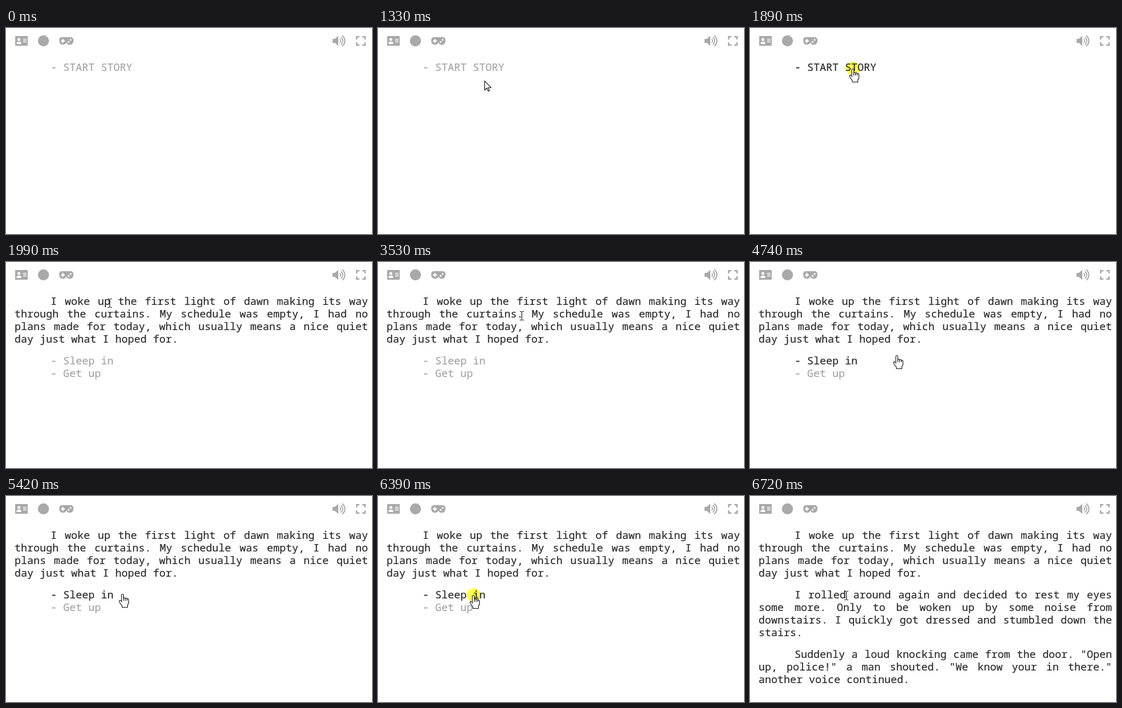
An HTML page with a canvas for the animation above (8000 ms loop, 640x360 px).

```html
<!DOCTYPE html>
<html lang="en">
<head>
<meta charset="utf-8">
<title>Interactive story</title>
<style>
  html, body { margin: 0; width: 100%; height: 100%; overflow: hidden; background: #fff; }
  #stage { position: absolute; left: 0; top: 0; width: 640px; height: 360px; overflow: hidden; background: #fff; }
  p {
    position: absolute; left: 15px; width: 618px; margin: 0;
    font: 18.33px/22px "Noto Sans Mono", monospace; font-variant-ligatures: none;
    color: #2b2b2b; text-align: justify; text-indent: 63px;
    -webkit-text-stroke: 0.2px currentColor;
  }
  p.option { color: #a5a5a5; }
  p.option.hover { color: #2b2b2b; }
  #click {
    position: absolute; width: 24px; height: 24px; border-radius: 50%;
    background: #ffff4a; mix-blend-mode: multiply;
  }
  canvas { position: absolute; left: 0; top: 0; width: 640px; height: 360px; }
</style>
</head>
<body>
<div id="stage">
  <p class="option" data-scenes="0" style="top:57px">- START STORY</p>
  <p data-scenes="12" style="top:57px">I woke up the first light of dawn making its way through the curtains. My schedule was empty, I had no plans made for today, which usually means a nice quiet day just what I hoped for.</p>
  <p class="option" data-scenes="1" style="top:161px">- Sleep in</p>
  <p class="option" data-scenes="1" style="top:183px">- Get up</p>
  <p data-scenes="2" style="top:161px">I rolled around again and decided to rest my eyes some more. Only to be woken up by some noise from downstairs. I quickly got dressed and stumbled down the stairs.</p>
  <p data-scenes="2" style="top:265px">Suddenly a loud knocking came from the door. "Open up, police!" a man shouted. "We know your in there." another voice continued.</p>
  <div id="click"></div>
  <canvas id="view"></canvas>
</div>
<script>
const LOOP = 8000;
const STEP = 110.2; // the pointer is sampled at this interval
const GREY = '#a9a9a9';
const SCENE_STARTS = [0, 1990, 6720];
const CLICKS = [[1890, 1990], [6390, 6720]];

// The pointer enters at ENTRY, then glides through these stops
const ENTRY = { t: 760, x: 444, y: 336 };
const MOVES = [
  { from: 760, to: 1330, x: 185, y: 91 },
  { from: 1330, to: 1550, x: 180, y: 71 },
  { from: 2990, to: 3530, x: 250, y: 93 },
  { from: 3530, to: 4080, x: 270, y: 120 },
  { from: 4190, to: 4740, x: 257, y: 163 },
  { from: 4740, to: 4960, x: 242, y: 169 },
  { from: 5070, to: 5640, x: 178, y: 173 },
  { from: 5750, to: 5860, x: 167, y: 173 }
];

const ARROW = new Path2D('M.5.5V16.5L4.3 13L6.8 18.5L9 17.5L6.5 12.2H11.7Z');
const HAND = new Path2D('M-2 13.5V2Q-2 .5-.25.5T1.5 2V7.5Q3 6 4.5 7.7Q6.5 6.7 7.5 8.7' +
  'Q10.5 8.2 10.5 11V16L8.5 20V23.5H-1V21L-5 15.5Q-7 12.2-5 11.2Q-3.5 11-2 13.5Z');
const KNUCKLES = new Path2D('M1.5 7.5V12M4.5 7.7V12M7.5 8.7V12');
const BEAM = new Path2D('M-2-6.5H1M2-6.5H5M1.5-6V8M-2 8.5H1M2 8.5H5');

const view = document.getElementById('view');
const ctx = view.getContext('2d');
const clickMark = document.getElementById('click');
const texts = [...document.querySelectorAll('p')];
const ratio = window.devicePixelRatio || 1;
view.width = 640 * ratio;
view.height = 360 * ratio;

const smooth = u => u * u * (3 - 2 * u);

function disc(x, y, r) {
  ctx.beginPath();
  ctx.arc(x, y, r, 0, Math.PI * 2);
  ctx.fill();
}

function box(x, y, w, h, r = 0) {
  ctx.beginPath();
  ctx.roundRect(x, y, w, h, r);
  ctx.fill();
}

function drawCard() {
  ctx.fillStyle = GREY;
  box(16, 14, 22, 17, 1);
  ctx.fillStyle = '#fff';
  disc(22.5, 20, 2.6);
  box(18.5, 24, 8, 4, [2, 2, 0, 0]);
  for (let y = 19; y <= 24; y += 2.5) box(30, y, 6, 1.2);
}

function drawGamepad() {
  ctx.fillStyle = GREY;
  box(93, 16, 25, 10, 5);
  disc(99.5, 22.8, 6.5);
  disc(111.5, 22.8, 6.5);
  ctx.fillStyle = '#fff';
  box(96, 21.5, 7, 2.2);
  box(98.4, 19.1, 2.2, 7);
  disc(109.5, 24.3, 1.6);
  disc(113, 20.8, 1.6);
}

function drawSpeaker() {
  ctx.fillStyle = GREY;
  ctx.fill(new Path2D('M571 19H575L581 13.8V31.2L575 26H571Z'));
  ctx.strokeStyle = GREY;
  ctx.lineWidth = 1.9;
  for (let i = 1; i <= 3; i++) {
    ctx.beginPath();
    ctx.arc(581.2, 22.5, i * 3.8, -0.95, 0.95);
    ctx.stroke();
  }
}

// One corner, mirrored around the centre
function drawExpand() {
  ctx.strokeStyle = GREY;
  ctx.lineWidth = 2.5;
  for (const sx of [-1, 1]) {
    for (const sy of [-1, 1]) {
      ctx.beginPath();
      ctx.moveTo(620.5 + sx * 2.5, 22.5 + sy * 7.3);
      ctx.lineTo(620.5 + sx * 7.3, 22.5 + sy * 7.3);
      ctx.lineTo(620.5 + sx * 7.3, 22.5 + sy * 2.5);
      ctx.stroke();
    }
  }
}

function drawToolbar() {
  drawCard();
  ctx.fillStyle = GREY;
  disc(65.5, 22.5, 9.7);
  drawGamepad();
  drawSpeaker();
  drawExpand();
}

function drawPointer({ x, y }, kind) {
  ctx.save();
  ctx.translate(x, y);
  ctx.fillStyle = '#fff';
  ctx.strokeStyle = '#0c0c18';
  ctx.lineWidth = 1.1;
  if (kind === 'beam') {
    ctx.stroke(BEAM);
  } else {
    const shape = kind === 'hand' ? HAND : ARROW;
    ctx.fill(shape);
    ctx.stroke(shape);
    if (kind === 'hand') ctx.stroke(KNUCKLES);
  }
  ctx.restore();
}

function pointerAt(time) {
  const t = Math.floor((time + 10) / STEP) * STEP - 10;
  if (t < ENTRY.t) return null;
  let { x, y } = ENTRY;
  for (const move of MOVES) {
    const u = (t - move.from) / (move.to - move.from);
    const k = smooth(Math.min(1, Math.max(0, u)));
    x += (move.x - x) * k;
    y += (move.y - y) * k;
  }
  return { x: Math.round(x), y: Math.round(y) };
}

// Shows the scene's texts and returns the pointer kind for what lies under it
function layoutTexts(scene, pointer) {
  let kind = 'arrow';
  for (const p of texts) {
    const shown = p.dataset.scenes.includes(scene);
    p.style.display = shown ? '' : 'none';
    if (!shown) continue;
    const dy = pointer ? pointer.y - p.offsetTop : -1;
    const over = dy >= 0 && dy < p.offsetHeight;
    const option = p.classList.contains('option');
    if (option) p.classList.toggle('hover', over);
    if (over) kind = option ? 'hand' : 'beam';
  }
  return kind;
}

function render(t) {
  const scene = SCENE_STARTS.filter(s => s <= t).length - 1;
  const pointer = pointerAt(t);
  const kind = layoutTexts(scene, pointer);

  const clicked = pointer && CLICKS.some(([a, b]) => t >= a && t < b);
  clickMark.style.display = clicked ? '' : 'none';
  if (clicked) {
    clickMark.style.left = pointer.x - 12.5 + 'px';
    clickMark.style.top = pointer.y - 12 + 'px';
  }

  ctx.setTransform(ratio, 0, 0, ratio, 0, 0);
  ctx.clearRect(0, 0, 640, 360);
  drawToolbar();
  if (pointer) drawPointer(pointer, kind);
}

const start = performance.now();
function tick() {
  render((performance.now() - start) % LOOP);
  requestAnimationFrame(tick);
}
tick();
</script>
</body>
</html>
```
